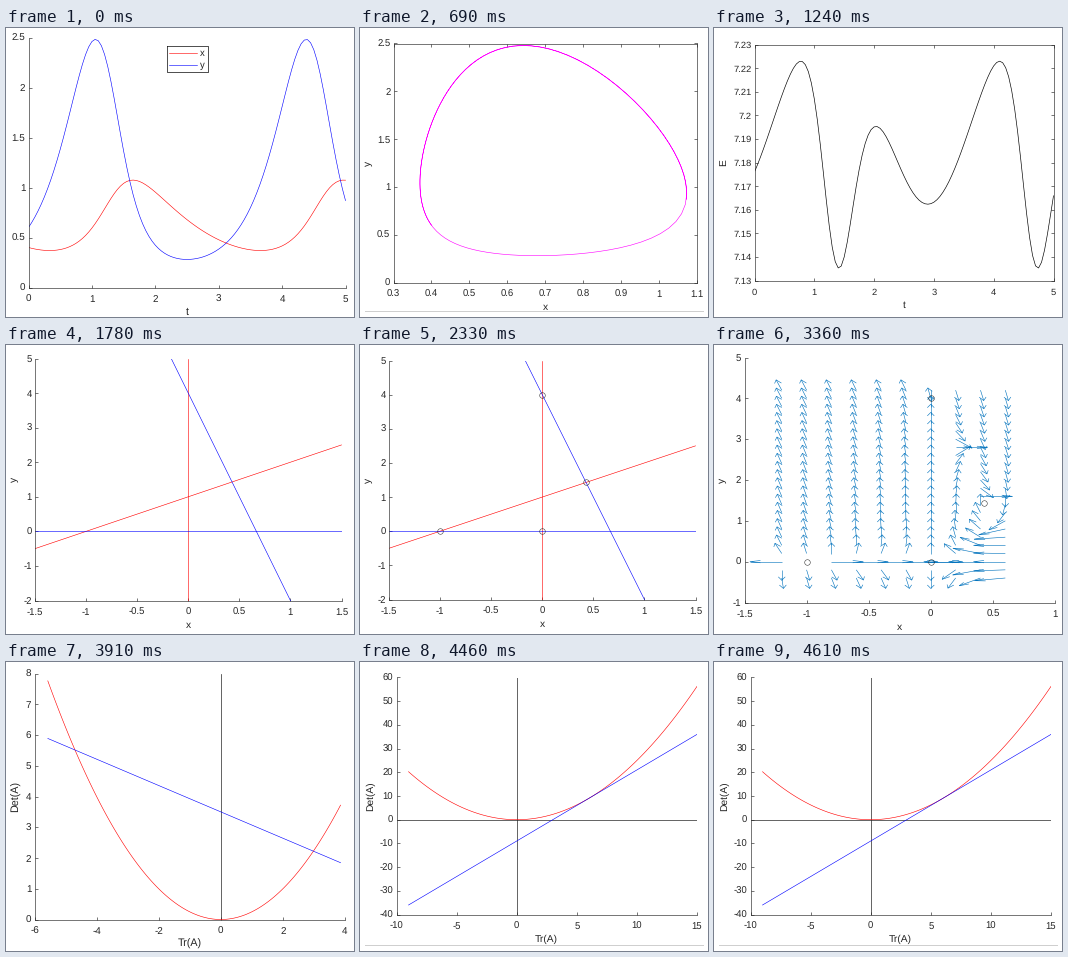
Animation, 348 px wide and 289 px high, one loop 5000 ms. Source, as a matplotlib script:

```python
import numpy as np
import matplotlib.pyplot as plt
from matplotlib.animation import FuncAnimation
from matplotlib.collections import LineCollection
from matplotlib.transforms import Affine2D

W, H, DPI = 348, 289, 64
PT = 72 / DPI                      # points per pixel
RED, BLUE, MAGENTA = "#ff0000", "#0000ff", "#ff00ff"
INK, RULE, FIELD = "#262626", "#cfcfcf", "#0072bd"
LINE, AXIS = 0.58, 0.62

CUTS = [540, 1080, 1630, 2170, 2800, 3910, 4460]
STEP_MS = 20
LOOP_MS = 5000

plt.rcParams["font.family"] = "Liberation Sans"
plt.rcParams["text.hinting"] = "none"
fig = plt.figure(figsize=(W / DPI, H / DPI), dpi=DPI, facecolor="white")
stage = Affine2D().scale(1 / W, -1 / H).translate(0, 1) + fig.transFigure


def put(ax, x, y, s, size, **kw):
    """Text at stage pixels, y downwards."""
    ax.text(x, y, s, transform=stage, fontsize=size * PT, color=INK, **kw)


def stroke(ax, xs, ys, color, width=LINE, **kw):
    ax.plot(xs, ys, color=color, lw=width * PT, **kw)


def stage_stroke(ax, xs, ys, color, width=LINE):
    stroke(ax, xs, ys, color, width, transform=stage, clip_on=False)


def make_plot(box, xticks, yticks, xlabel, ylabel="", size=9.5, boxed=False,
              label_x=8.5, rule=None):
    left, top, right, bottom = box
    ax = fig.add_axes([left / W, 1 - bottom / H, (right - left) / W, (bottom - top) / H])
    ax.set(xlim=(xticks[0], xticks[-1]), ylim=(yticks[0], yticks[-1]),
           xticks=xticks, yticks=yticks)
    ax.set_autoscale_on(False)
    ax.patch.set_visible(False)
    ax.tick_params(direction="in", length=3 * PT, width=AXIS * PT, color=INK,
                   labelbottom=False, labelleft=False, top=boxed, right=boxed)
    for side, spine in ax.spines.items():
        spine.set(linewidth=AXIS * PT, edgecolor=INK)
        spine.set_visible(boxed or side in ("left", "bottom"))

    for v in xticks:
        x = left + (v - xticks[0]) / (xticks[-1] - xticks[0]) * (right - left)
        put(ax, x, bottom + 14.3, f"{v:g}", size, ha="center", va="baseline")
    for v in yticks:
        y = bottom - (v - yticks[0]) / (yticks[-1] - yticks[0]) * (bottom - top)
        put(ax, left - 3.2, y + 3.5, f"{v:g}", size, ha="right", va="baseline")
    put(ax, (left + right) / 2, bottom + 27.6, xlabel, size + 0.8,
        ha="center", va="baseline")
    put(ax, label_x, (top + bottom) / 2, ylabel, size + 0.8,
        ha="center", va="center", rotation=90)
    if rule:
        stage_stroke(ax, [5, 343], [rule, rule], RULE, 1)
    return ax


def ticks(lo, hi, step):
    return np.round(np.arange(lo, hi + step / 2, step), 6)


def predator_prey(dt=0.05, end=5):
    """Semi-implicit Euler orbit of x' = x(y - 1), y' = y(4 - 6x)."""
    x, y = [0.4], [0.6]
    for _ in range(round(end / dt)):
        x.append(x[-1] + dt * x[-1] * (y[-1] - 1))
        y.append(y[-1] + dt * y[-1] * (4 - 6 * x[-1]))
    return np.linspace(0, end, len(x)), np.array(x), np.array(y)


def equilibria(ax):
    ax.plot([-1, 0, 0, 3 / 7], [0, 0, 4, 10 / 7], "o", ms=5.6 * PT,
            mfc="none", mec=INK, mew=0.5 * PT)


def time_series(t, x, y):
    ax = make_plot((22.5, 9.5, 339.5, 259.5), ticks(0, 5, 1), ticks(0, 2.5, 0.5),
                   "t", size=9.9, rule=288.5)
    stroke(ax, t, x, RED)
    stroke(ax, t, y, BLUE)
    stage_stroke(ax, [160.5, 201.5, 201.5, 160.5, 160.5],
                 [17.5, 17.5, 43.5, 43.5, 17.5], INK, 0.8)
    for row, color, name in ((24.5, RED, "x"), (37, BLUE, "y")):
        stage_stroke(ax, [163, 191], [row, row], color)
        put(ax, 194, row + 3, name, 9.5, va="baseline")
    return ax


def phase_orbit(x, y):
    ax = make_plot((33.5, 15.5, 336.5, 254.5), ticks(0.3, 1.1, 0.1), ticks(0, 2.5, 0.5),
                   "x", "y", boxed=True, rule=282.5)
    stroke(ax, x, y, MAGENTA)
    return ax


def energy(t, x, y):
    ax = make_plot((40.5, 16.5, 339.5, 252.5), ticks(0, 5, 1), ticks(7.13, 7.23, 0.01),
                   "t", "E", size=9.4, boxed=True, label_x=9.5)
    stroke(ax, t, 6 * x - 4 * np.log(x) + y - np.log(y), "black", 0.65)
    return ax


def nullclines(box, marked=False):
    ax = make_plot(box, ticks(-1.5, 1.5, 0.5), ticks(-2, 5, 1), "x", "y")
    x = np.array([-1.5, 1.5])
    stroke(ax, [0, 0], [-2, 5], RED)
    stroke(ax, x, 1 + x, RED)
    stroke(ax, x, [0, 0], BLUE)
    stroke(ax, x, 4 - 6 * x, BLUE)
    if marked:
        equilibria(ax)
    return ax


def direction_field(length=0.256, head=0.33, spread=0.33):
    ax = make_plot((30.5, 12.5, 341, 257.5), ticks(-1.5, 1, 0.5), ticks(-1, 5, 1),
                   "x", "y", size=9.6)
    parts = []
    # Stepping back from 0.6 leaves a rounding error at x = 0, which
    # normalising turns into full arrows at the equilibria there.
    for x in 0.6 - 0.2 * np.arange(10):
        for y in ticks(-0.4, 4.2, 0.2):
            v = np.array([x * (y - 1 - x), y * (4 - 6 * x - y)])
            norm = np.hypot(*v)
            if norm == 0:
                continue
            tail = np.array([x, y])
            shaft = v / norm * length
            side = spread * np.array([-shaft[1], shaft[0]])
            tip = tail + shaft
            parts += [[tail, tip],
                      [tip - head * (shaft + side), tip, tip - head * (shaft - side)]]
    ax.add_collection(LineCollection(parts, colors=FIELD, linewidths=LINE * PT),
                      autolim=False)
    equilibria(ax)
    return ax


def trace_det(box, xticks, yticks, span, slope, offset, size, **kw):
    ax = make_plot(box, xticks, yticks, "Tr(A)", "Det(A)", size=size, label_x=10, **kw)
    tr = np.linspace(*span, 120)
    stroke(ax, [0, 0], yticks[[0, -1]], INK, 0.7)
    if yticks[0] < 0:
        stroke(ax, xticks[[0, -1]], [0, 0], INK, 0.7)
    stroke(ax, tr, tr ** 2 / 4, RED)
    stroke(ax, tr, slope * tr + offset, BLUE)
    return ax


t, x, y = predator_prey()
slides = [
    time_series(t, x, y),
    phase_orbit(x, y),
    energy(t, x, y),
    nullclines((29, 13.5, 335.5, 255.5)),
    nullclines((29, 15.5, 335.5, 254.5), marked=True),
    direction_field(),
    trace_det((28.5, 11.5, 339, 257.5), ticks(-6, 4, 2), ticks(0, 8, 1),
              (-39 / 7, 27 / 7), -3 / 7, 3.5, 9.9),
    trace_det((36.5, 15.5, 337, 252.5), ticks(-10, 15, 5), ticks(-40, 60, 10),
              (-9, 15), 3, -9, 9.5, rule=282.5),
]


def show(frame):
    current = sum(frame * STEP_MS >= cut - STEP_MS / 2 for cut in CUTS)
    for i, ax in enumerate(slides):
        ax.set_visible(i == current)
    return slides


anim = FuncAnimation(fig, show, frames=LOOP_MS // STEP_MS, init_func=lambda: show(0),
                     interval=STEP_MS, repeat=True, repeat_delay=0, blit=False)
plt.show()
```
